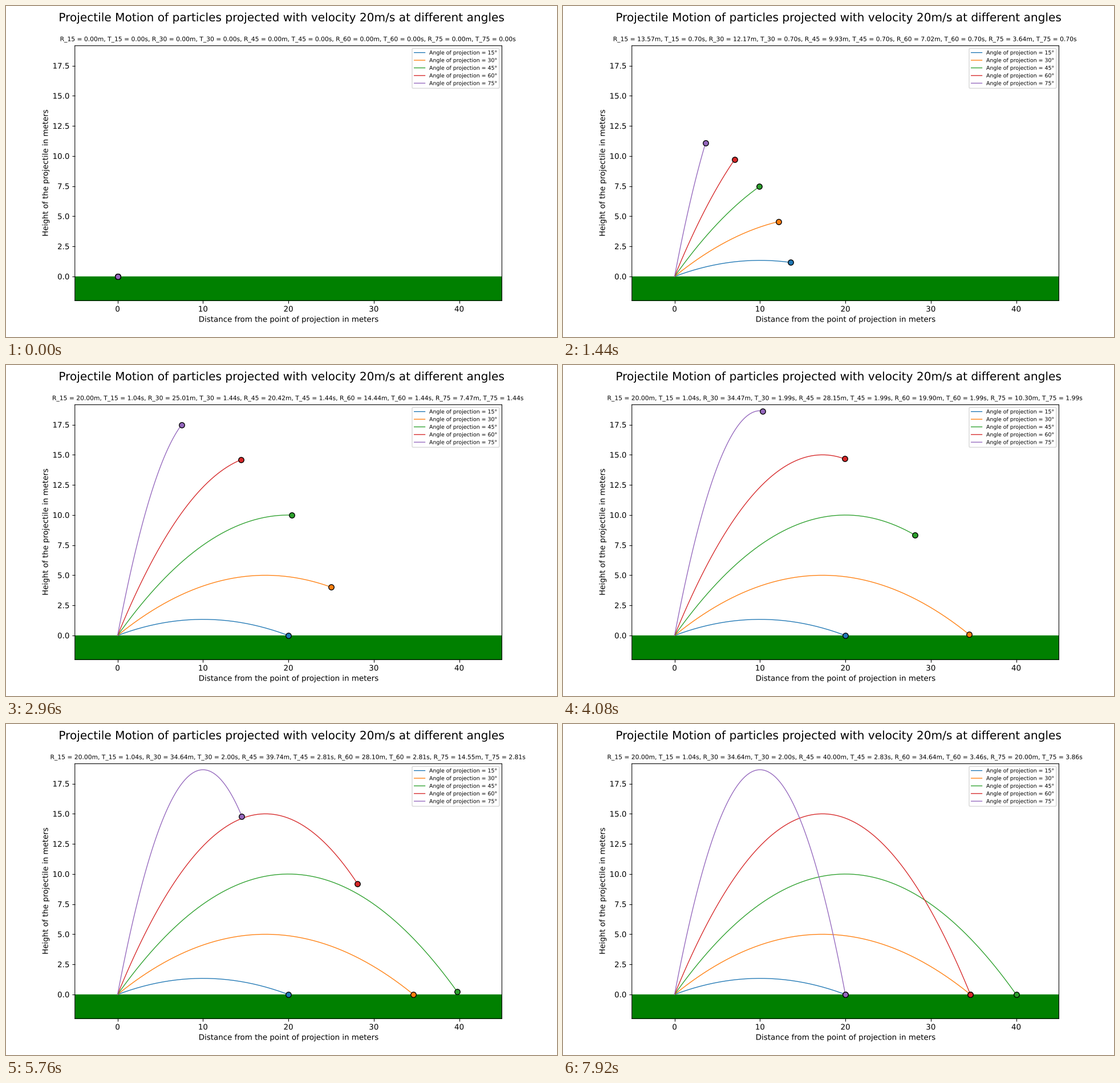
These frames come from a looping animation (966x580 px, 8000 ms). A matplotlib script:

```python
import numpy as np
import matplotlib.pyplot as plt
from matplotlib import patheffects
from matplotlib.animation import FuncAnimation

DPI = 96.6
FRAMES = 100
SPEED = 20
G = 10
ANGLES = [15, 30, 45, 60, 75]

# Path effects draw text as smooth outlines; no snapping keeps edges exact.
plt.rcParams.update({
    "font.family": "DejaVu Sans",
    "text.hinting": "no_hinting",
    "path.snap": False,
    "path.effects": [patheffects.Normal()],
})


def flight_time(angle):
    return 2 * SPEED * np.sin(np.radians(angle)) / G


def position(angle, t):
    a = np.radians(angle)
    return SPEED * np.cos(a) * t, SPEED * np.sin(a) * t - G * t**2 / 2


times = np.linspace(0, flight_time(ANGLES[-1]), FRAMES)
peak = (SPEED * np.sin(np.radians(ANGLES[-1]))) ** 2 / (2 * G)

fig, ax = plt.subplots(figsize=(966 / DPI, 580 / DPI), dpi=DPI)
fig.subplots_adjust(left=0.125, right=0.9, bottom=0.11, top=0.88)
fig.suptitle(
    "Projectile Motion of particles projected with velocity "
    f"{SPEED}m/s at different angles",
    fontsize=15,
)
ax.set_xlim(-5, 45)
ax.set_ylim(-2, peak + 0.5)
ax.set_xlabel("Distance from the point of projection in meters")
ax.set_ylabel("Height of the projectile in meters")
ax.fill_between([-5, 45], -2, 0, color="green")
title = ax.set_title("", fontsize=8)

paths, balls = [], []
for i, angle in enumerate(ANGLES):
    label = f"Angle of projection = {angle}°"
    paths += ax.plot([], [], color=f"C{i}", lw=1, label=label)
    balls.append(ax.scatter([0], [0], s=50, color=f"C{i}", edgecolors="black",
                            linewidths=1, zorder=2.4))
ax.legend(loc="upper right", fontsize=7)


def update(frame):
    parts = []
    for angle, path, ball in zip(ANGLES, paths, balls):
        # Each particle stops where it lands.
        t = np.minimum(times[:frame + 1], flight_time(angle))
        x, y = position(angle, t)
        path.set_data(x, y)
        ball.set_offsets([(x[-1], y[-1])])
        parts.append(f"R_{angle} = {x[-1]:.2f}m, T_{angle} = {t[-1]:.2f}s")
    title.set_text(", ".join(parts))
    return [*paths, *balls, title]


anim = FuncAnimation(fig, update, frames=FRAMES, interval=80,
                     init_func=lambda: update(0), repeat=True, repeat_delay=0)
plt.show()
```
